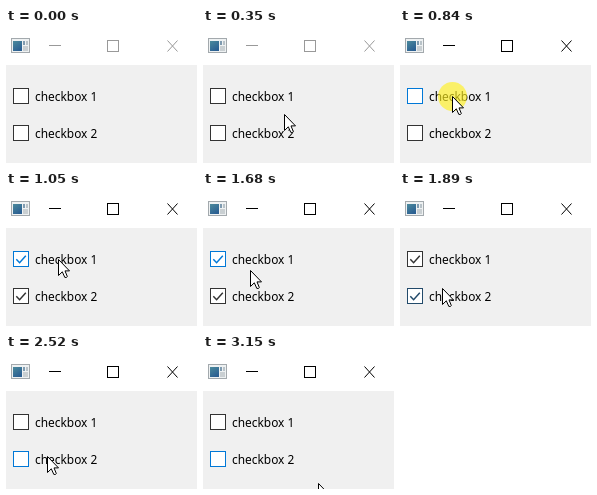
These frames come from a looping animation (191 by 135 pixels, 3220 ms). An HTML page:

```html
<!DOCTYPE html>
<html lang="en">
<head>
<meta charset="utf-8">
<title>Checkboxes</title>
<style>
html, body { margin: 0; width: 100%; height: 100%; overflow: hidden; background: #f0f0f0; }
svg { display: block; width: 100vw; height: 100vh; }
text { font: 11.9px "Noto Sans", "Open Sans", sans-serif; fill: #000; }
.crisp { shape-rendering: crispEdges; }
</style>
</head>
<body>
<svg viewBox="0 0 191 135" preserveAspectRatio="none">
  <rect width="191" height="135" fill="#f0f0f0"/>
  <rect width="191" height="37" fill="#fff"/>
  <defs>
    <linearGradient id="pane" x2="0.6" y2="1">
      <stop offset="0" stop-color="#4b8a9c"/>
      <stop offset="1" stop-color="#2b5f92"/>
    </linearGradient>
  </defs>
  <g class="crisp">
    <rect x="5" y="10" width="19" height="15" fill="#a3a9ad"/>
    <rect x="6" y="11" width="17" height="13" fill="#eef1f2"/>
    <rect x="7" y="13" width="9" height="10" fill="url(#pane)"/>
    <rect x="17" y="13" width="2" height="4" fill="#7f9bb0"/>
    <rect x="20" y="13" width="2" height="4" fill="#b8c2c8"/>
    <rect x="17" y="18" width="5" height="5" fill="#c9cfd2"/>
  </g>
  <g id="buttons" fill="none">
    <path class="crisp" d="M43 17.5H55M101.5 12.5h11v11h-11z"/>
    <path d="M161.5 12.5l10 11M171.5 12.5l-10 11"/>
  </g>
  <g id="boxes"></g>
  <circle id="halo" r="14.5" fill="#fff01e" opacity=".65"/>
  <path id="arrow" d="M.5 .5V16.5L4.3 12.8L6.8 18.4H8.6L9.3 17.5L7 11.9H11.5Z" fill="#fff" stroke="#000"/>
</svg>
<script>
const LOOP = 3220, STEP = 70;
const $ = id => document.getElementById(id);
const ramp = (t, a, b) => Math.min(1, Math.max(0, (t - a) / (b - a)));

// Pointer positions, one per step, held until the next move
const moves = [
  { at: 210, pts: [[118, 115], [101, 101], [81, 86], [66, 76], [58, 71], [54, 69], [52, 68]] },
  { at: 1680, pts: [[47, 79], [45, 86], [43, 92], [42, 97], [41, 100], [41, 101], [41, 102]] },
  { at: 3010, pts: [[52, 106], [84, 118], [115, 129]] }
];

const DARK = [51, 51, 51], BLUE = [0, 120, 215];
const mix = k => `rgb(${DARK.map((c, i) => Math.round(c + (BLUE[i] - c) * k))})`;

$('boxes').innerHTML = [1, 2].map(n => `
  <g transform="translate(0 ${(n - 1) * 37})">
    <g id="box${n}">
      <rect class="crisp" x="7.5" y="60.5" width="15" height="15" fill="#fff"/>
      <path id="tick${n}" d="M10.3 68.3L13.6 71.7L19.8 64.8" fill="none" stroke-width="1.5"/>
    </g>
    <text x="29" y="73">checkbox ${n}</text>
  </g>`).join('');

function pointer(t) {
  const m = moves.filter(m => t >= m.at).pop();
  return m && m.pts[Math.min(m.pts.length - 1, Math.floor((t - m.at) / STEP))];
}

function draw(time) {
  const t = Math.floor(time % LOOP / STEP) * STEP;
  const p = pointer(t);
  const clicked = (t >= 840 && t < 1050) || (t >= 2310 && t < 2520);
  const checked = ramp(t, 840, 1050) - ramp(t, 2310, 2520);
  const hover = [ramp(t, 350, 560) - ramp(t, 1680, 1890), ramp(t, 1820, 2030)];

  $('buttons').setAttribute('stroke', t < 840 ? '#999' : '#000');
  hover.forEach((k, i) => {
    $('box' + (i + 1)).setAttribute('stroke', mix(k));
    $('tick' + (i + 1)).setAttribute('opacity', checked);
  });

  $('arrow').setAttribute('visibility', p ? 'visible' : 'hidden');
  $('halo').setAttribute('visibility', clicked ? 'visible' : 'hidden');
  if (p) {
    $('arrow').setAttribute('transform', `translate(${p})`);
    $('halo').setAttribute('transform', `translate(${p[0] + .5} ${p[1] + .5})`);
  }
}

const start = performance.now();
function tick() {
  draw(performance.now() - start);
  requestAnimationFrame(tick);
}
tick();
</script>
</body>
</html>
```
